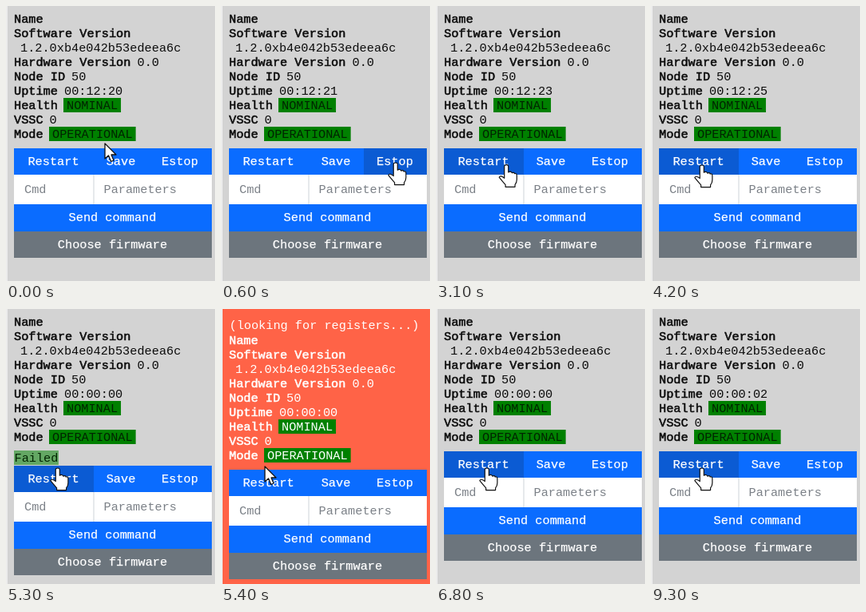
Write an HTML page that moves like this. It is 262 by 344 pixels and loops after 9.6 s.

```html
<!DOCTYPE html>
<html lang="en">
<head>
<meta charset="utf-8">
<title>Node panel</title>
<style>
  html, body { margin: 0; width: 100%; height: 100%; overflow: hidden; background: #ececec; }
  svg { display: block; width: 262px; height: 344px; }
  text { font: 15.25px "Liberation Mono", "Courier New", monospace; }
  .label { stroke: currentColor; stroke-width: .55px; }
  .button text { fill: #fff; stroke: #fff; stroke-width: .25px; text-anchor: middle; }
  .hint { fill: #7b8087; }
  .badge rect { fill: #008000; }
  .badge text { fill: #002400; }
  .lost .badge text { fill: #fff; }
  #info { color: #0c0c0c; fill: currentColor; }
  .lost #info { color: #fff; }
  #panel { fill: #d3d3d3; }
  .lost #panel { fill: #ff6347; }
  #cursor path { fill: #fff; stroke: #111; stroke-width: 1.3; stroke-linejoin: round; }
</style>
</head>
<body>
<svg id="stage" viewBox="0 0 262 344">
  <rect id="panel" x="2" width="260" height="344"/>
  <text id="search" x="10.5" y="24.5" fill="#fff">(looking for registers...)</text>
  <g id="info"></g>
  <g id="failed"></g>
  <g id="controls"></g>
  <g id="cursor">
    <path id="arrow" d="M0 0V19L4.5 15L7.7 22.5L11 21L8 14H14Z"/>
    <path id="hand" transform="scale(.92)" d="M-3 2.5Q-3 0 0 0Q2.5 0 2.5 2.5V10Q6 8 7.5 11Q10 9.5 11 12Q14 11 14 14.5V20Q14 24 11.5 27V30H-1.5V27Q-6 22 -10 17Q-8.5 13.5 -3 18Z"/>
  </g>
</svg>
<script>
const $ = id => document.getElementById(id);
const LOOP = 9600, STEP = 100;
const BLUE = '#0a6cff', BLUE_HOVER = '#0b5bd3';

const text = (x, y, s, attrs = '') => `<text x="${x}" y="${y}" ${attrs}>${s}</text>`;
const rect = (x, y, w, h, fill) => `<rect x="${x}" y="${y}" width="${w}" height="${h}" fill="${fill}"/>`;
const badge = (x, y, s, pad = 4) =>
  `<g class="badge">${rect(x, y - 14, s.length * 9.15 + 2 * pad, 18)}${text(x + pad, y, s)}</g>`;
const button = (x, y, w, h, s, fill) =>
  `<g class="button">${rect(x, y, w, h, fill)}${text(x + w / 2 - .5, y + h / 2 + 4, s)}</g>`;

const labels = ['Name', 'Software Version', '', 'Hardware Version', 'Node ID', 'Uptime', 'Health', 'VSSC', 'Mode'];
const lineY = i => 21 + 18 * i;
$('info').innerHTML =
  labels.map((s, i) => text(10, lineY(i), s, 'class="label"')).join('') +
  text(18, lineY(2), '1.2.0xb4e042b53edeea6c') +
  text(164.5, lineY(3), '0.0') +
  text(82, lineY(4), '50') +
  text(73, lineY(5), '', 'id="uptime"') +
  badge(72, lineY(6), 'NOMINAL') +
  text(54.5, lineY(7), '0') +
  badge(54, lineY(8), 'OPERATIONAL');

$('failed').innerHTML = badge(10, 191, 'Failed', .5);
const failedBack = $('failed').querySelector('rect');

const tabs = [[10, 100, 'Restart'], [110, 69, 'Save'], [179, 79, 'Estop']];
$('controls').innerHTML =
  tabs.map(([x, w, s]) => button(x, 178, w, 33, s, BLUE)).join('') +
  rect(10, 211, 248, 37, '#fff') + rect(109.5, 211, 1, 37, '#ced4da') +
  text(23, 234, 'Cmd', 'class="hint"') + text(122.5, 234, 'Parameters', 'class="hint"') +
  button(10, 248, 248, 34, 'Send command', BLUE) +
  button(10, 282, 248, 33, 'Choose firmware', '#6c757d');
const tabRects = [...$('controls').querySelectorAll('.button rect')].slice(0, 3);

// Pointer path: time, x, y
const path = [
  [0, 124, 172], [600, 219, 196], [1200, 219, 196], [1600, 144, 196],
  [2700, 144, 196], [3200, 82, 199], [3400, 82, 199], [3700, 64, 199],
  [4400, 64, 199], [5300, 65, 199], [5400, 55, 197], [6100, 55, 197],
  [6500, 60, 198], [6700, 60, 198], [6800, 64, 199], [LOOP, 64, 199]
];
function pointer(t) {
  const i = path.findIndex(p => p[0] > t);
  const [t0, x0, y0] = path[i - 1], [t1, x1, y1] = path[i];
  const k = (t - t0) / (t1 - t0), e = k * k * (3 - 2 * k);
  return [x0 + (x1 - x0) * e, y0 + (y1 - y0) * e];
}

// Uptime: start time, seconds shown
const ticks = [[0, 740], [300, 741], [1300, 742], [2200, 743], [3200, 744], [4200, 745], [5200, 0], [8300, 1], [9300, 2]];
function uptime(t) {
  const s = ticks.filter(k => k[0] <= t).pop()[1];
  return [s / 3600, s / 60 % 60, s % 60].map(n => String(Math.floor(n)).padStart(2, '0')).join(':');
}

function draw(now) {
  const t = Math.floor(now % LOOP / STEP) * STEP;
  const failed = t >= 4500 && t < 5400;
  const lost = t >= 5400 && t < 6200;
  const stale = t >= 5400 && t < 6800;
  const drop = lost ? 23 : failed ? 18 : 0;
  const [x, y] = pointer(t);
  const over = !stale && y >= 178 + drop;

  $('stage').classList.toggle('lost', lost);
  $('search').style.display = lost ? '' : 'none';
  $('info').setAttribute('transform', `translate(0 ${lost ? 23 : 0})`);
  $('controls').setAttribute('transform', `translate(0 ${drop})`);
  $('failed').style.display = failed ? '' : 'none';
  failedBack.setAttribute('fill-opacity', 1 - (t - 4500) / 1700);
  $('uptime').textContent = uptime(t);

  tabs.forEach(([left, w], i) => {
    const hover = over && x >= left && x < left + w;
    tabRects[i].setAttribute('fill', hover ? BLUE_HOVER : BLUE);
  });
  $('cursor').setAttribute('transform', `translate(${x} ${y})`);
  $('hand').style.display = over ? '' : 'none';
  $('arrow').style.display = over ? 'none' : '';
}

const start = performance.now();
function frame() {
  draw(performance.now() - start);
  requestAnimationFrame(frame);
}
frame();
</script>
</body>
</html>
```
